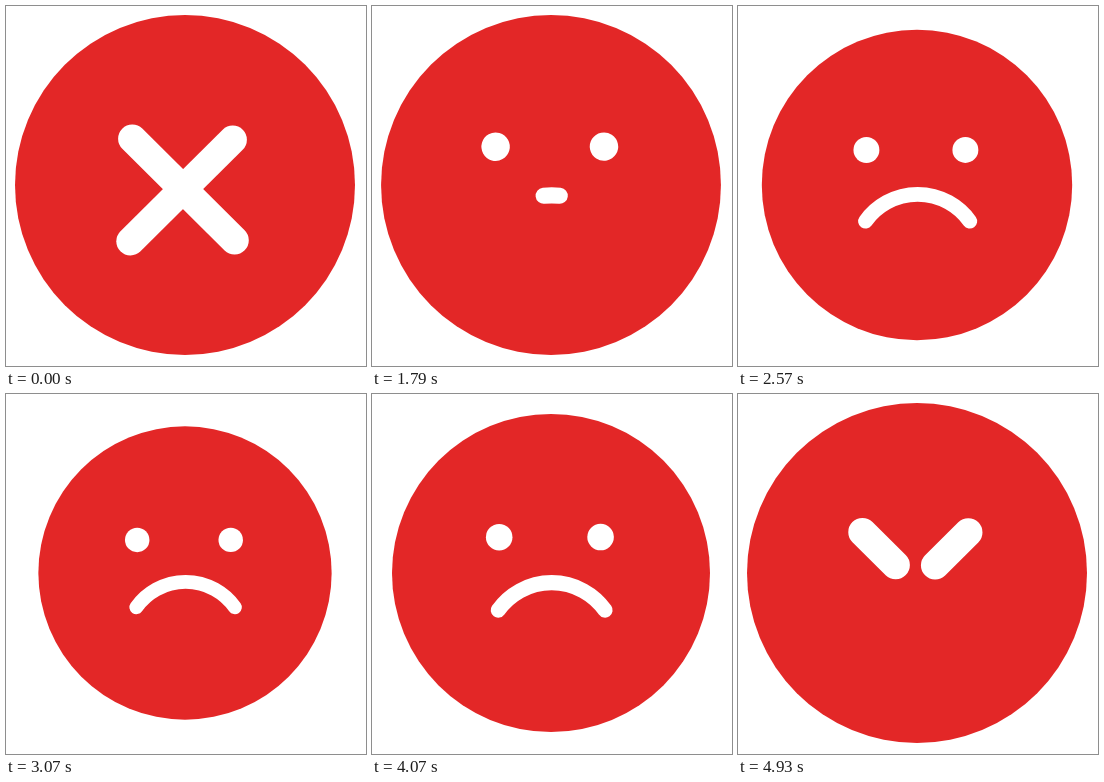
An HTML page for the animation above (5 s loop, 360 by 360 pixels).

```html
<!DOCTYPE html>
<html lang="en">
<head>
<meta charset="utf-8">
<title>Cross and sad face</title>
<style>
  html, body { margin: 0; width: 100%; height: 100%; overflow: hidden; background: #fff; }
  svg { display: block; width: 100vw; height: 100vh; }
</style>
</head>
<body>
<svg viewBox="0 0 360 360">
  <g id="face" fill="none" stroke="#fff" stroke-linecap="round">
    <circle r="170" fill="#e32727" stroke="none"/>
    <path id="left" stroke-width="28.4"/>
    <path id="right" stroke-width="28.4"/>
    <path id="mouth" stroke-width="16.2"/>
  </g>
</svg>
<script>
const LOOP = 5000, STEPS = 70, CENTER = 179;
const [face, left, right, mouth] =
  ['face', 'left', 'right', 'mouth'].map(id => document.getElementById(id));

const span = (t, a, b) => Math.min(1, Math.max(0, (t - a) / (b - a)));
const mix = (a, b, p) => a + (b - a) * p;
const sine = p => (1 - Math.cos(Math.PI * p)) / 2;
const cubic = p => p < 0.5 ? 4 * p ** 3 : 1 - 4 * (1 - p) ** 3;

// A bar of the cross that collapses into an eye as grow goes from 1 to 0.
function drawBar(el, eye, top, reach, grow) {
  const x = mix(eye[0], top[0], grow), y = mix(eye[1], top[1], grow);
  el.setAttribute('d', `M${x} ${y}l${reach[0] * grow + 0.001} ${reach[1] * grow}`);
}

function drawMouth(open) {
  const r = 70.2, a = 0.95 * open, x = r * Math.sin(a), y = 80.5 - r * Math.cos(a);
  mouth.setAttribute('d', `M${0.7 - x} ${y}A${r} ${r} 0 0 1 ${0.7 + x} ${y}`);
  mouth.style.display = open > 0.001 ? '' : 'none';
}

function draw(t) {
  const shrink = sine(span(t, 1740, 3170)) - sine(span(t, 3325, 4755));
  face.setAttribute('transform',
    `translate(${CENTER} ${CENTER}) scale(${1 - 0.139 * shrink})`);

  const grow = 1 - cubic(span(t, 1357, 1790)) + span(t, 4834, 5000) ** 2;
  drawBar(left, [-55.4, -38.3], [-52.7, -46.3], [102.3, 101.6], grow);
  drawBar(right, [53, -38.4], [47.7, -45.3], [-102.2, 101.6], grow);

  drawMouth(sine(span(t, 1700, 2080)) - sine(span(t, 4480, 4830)));
}

let start;
function tick(now) {
  start ??= now;
  const step = Math.floor((now - start) % LOOP * STEPS / LOOP + 0.05) % STEPS;
  draw(step * LOOP / STEPS);
  requestAnimationFrame(tick);
}
draw(0);
requestAnimationFrame(tick);
</script>
</body>
</html>
```
